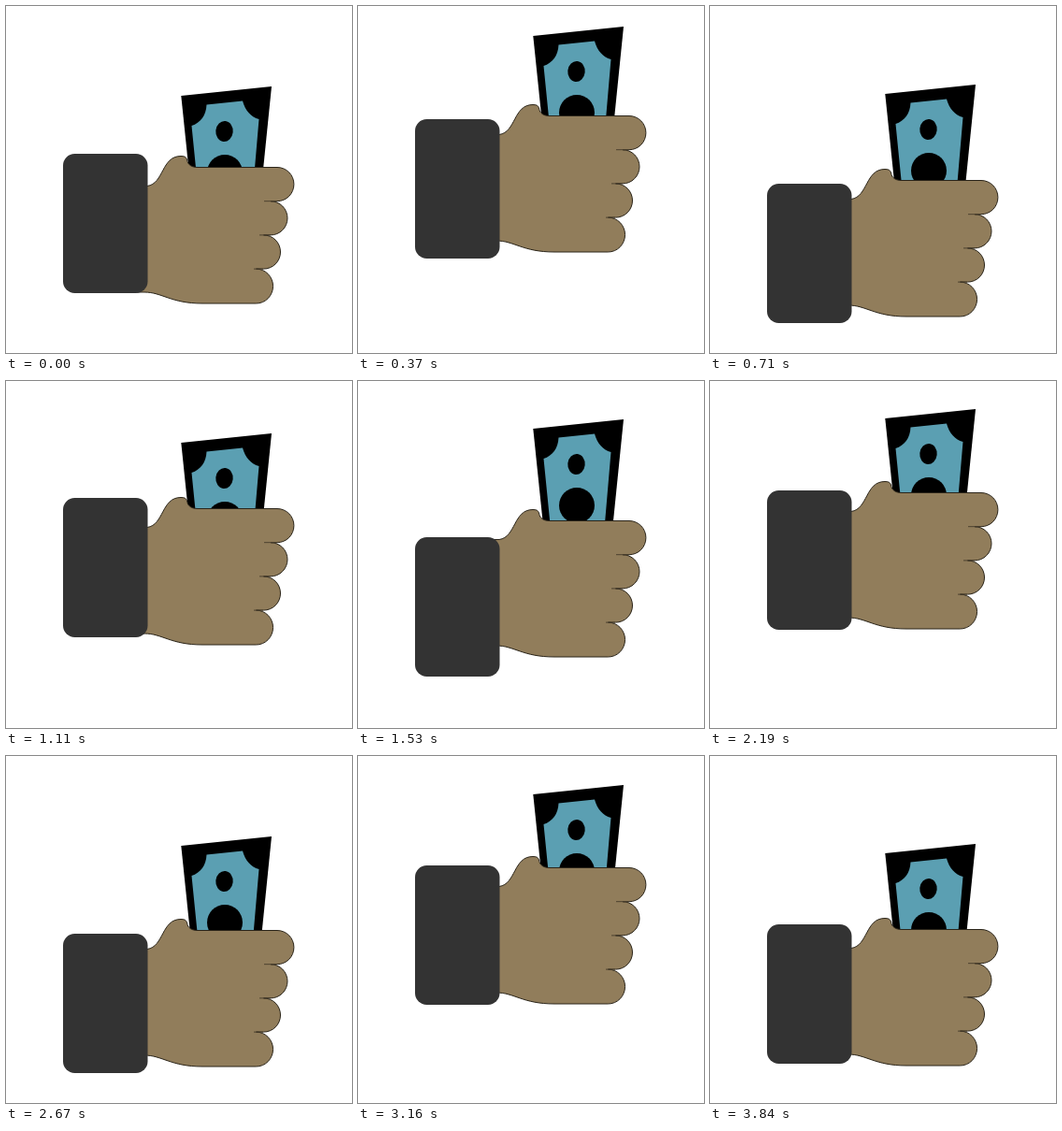
These frames come from a looping animation (370x371 px, 3.86 s). An HTML page with a canvas:

```html
<!DOCTYPE html>
<html lang="en">
<head>
<meta charset="utf-8">
<title>Hand with banknote</title>
<style>
html, body { margin: 0; width: 100%; height: 100%; overflow: hidden; background: #fff; }
canvas { display: block; width: 370px; height: 371px; }
</style>
</head>
<body>
<canvas id="stage" width="370" height="371"></canvas>
<script>
const ctx = document.getElementById('stage').getContext('2d');
const LOOP = 3860, CYCLE = 975, RISE = 73.5, LEAD = 18;
const SKIN = '#917d5b', CLOTH = '#333333', NOTE = '#5b9fb2';

// Symmetric cubic ease with handles at k and 1 - k.
function ease(x, k) {
  let lo = 0, hi = 1;
  for (let i = 0; i < 24; i++) {
    const s = (lo + hi) / 2, r = 1 - s;
    if (3 * s * r * r * k + 3 * s * s * r * (1 - k) + s * s * s < x) lo = s;
    else hi = s;
  }
  return lo * lo * (3 - 2 * lo);
}

// Vertical position of a part that is lowest at time `low`.
function bob(t, low, top, k) {
  const u = ((((t - low) / CYCLE) % 1) + 1) % 1 * 2;
  const p = u < 1 ? 1 - ease(u, k) : ease(u - 1, k);
  return top + RISE * p;
}

// Whole pixels keep the flat edges crisp.
function at(y, draw) {
  ctx.save();
  ctx.translate(0, Math.round(y));
  draw();
  ctx.restore();
}

function fill(path, color) {
  ctx.fillStyle = color;
  ctx.fill(path);
}

function oval(x, y, rx, ry, tilt) {
  const p = new Path2D();
  p.ellipse(x, y, rx, ry, tilt, 0, Math.PI * 2);
  return p;
}

const paper = new Path2D('M187.3 10 L284 0 L268.8 150 L201.8 150 Z');
const panel = new Path2D(
  'M214.5 19.5 L253 15.5 C256 26 262 32.5 270.5 35 L261.5 140 L208.3 140 L198.5 42 C208 39 214 31 214.5 19.5 Z');
const spot = oval(233.5, 48, 9.2, 11, 0.1);
const disc = oval(234, 92, 19, 19, 0);

// Measured from the flat top of the fist.
const fist = new Path2D(
  'M140 20.5 L151 20.5 C169 18 166 -11.5 187 -11.5 C196 -11.5 192 -6 196 -2.5 C198 -.5 201 .5 205 .5 ' +
  'L290 .5 A17.9 18.1 0 0 1 290 36.7 L283 36.7 A18 18.1 0 0 1 283 72.9 ' +
  'L275.5 72.9 A18 18.1 0 0 1 275.5 109.1 L267.5 109.1 A18 18.4 0 0 1 267.5 146 ' +
  'L210 146 C176 146 167 134 148 134 L140 134 Z');
const folds = new Path2D('M276 36.7 H290 M271 72.9 H283 M265 109.1 H275');

const cuff = new Path2D();
cuff.roundRect(61, 0, 90.5, 149, 12.5);

function drawNote() {
  fill(paper, '#000');
  fill(panel, NOTE);
  fill(spot, '#000');
  fill(disc, '#000');
}

function drawFist() {
  fill(fist, SKIN);
  ctx.strokeStyle = '#2a2419';
  ctx.lineWidth = 1;
  ctx.stroke(fist);
  ctx.strokeStyle = '#4c412e';
  ctx.stroke(folds);
}

function frame(now) {
  const t = now % LOOP;
  const m = t + LEAD * Math.max(0, 1 - t / 500); // short head start, fading out
  ctx.fillStyle = '#fff';
  ctx.fillRect(0, 0, 370, 371);
  at(bob(m, 858, 22, 0.53), drawNote);
  at(bob(m, 811, 116.3, 0.56), drawFist);
  at(bob(m, 760, 117, 0.6), () => fill(cuff, CLOTH));
}

let start = null;
function tick(now) {
  if (start === null) start = now;
  frame(now - start);
  requestAnimationFrame(tick);
}
frame(0);
requestAnimationFrame(tick);
</script>
</body>
</html>
```
